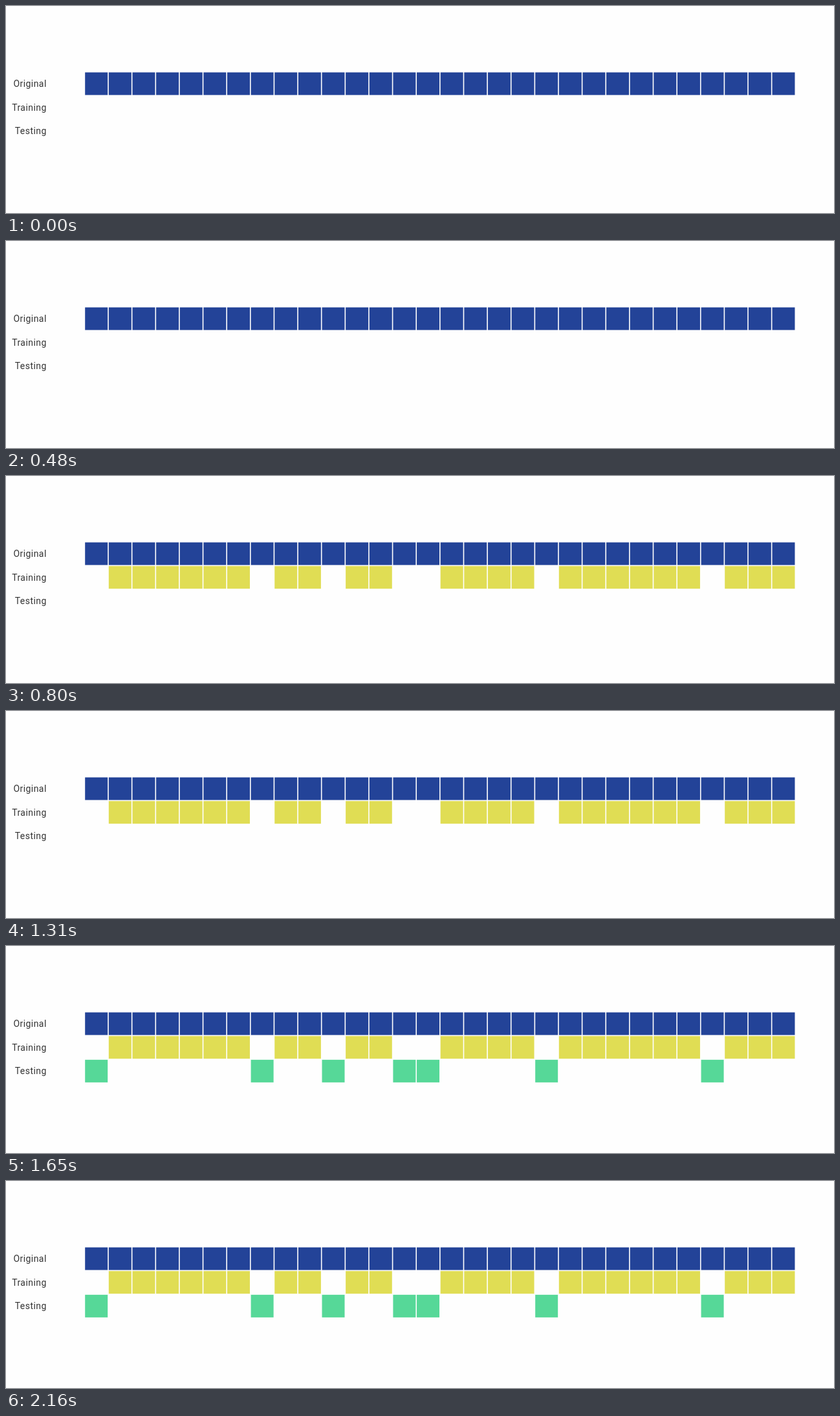
An HTML page that plays this animation: 1280 by 320 pixels, repeating every 2500 ms.

```html
<!DOCTYPE html>
<html lang="en">
<head>
<meta charset="utf-8">
<title>Train and test split</title>
<style>
  html, body { margin: 0; width: 100%; height: 100%; overflow: hidden; background: #fefefe; }
  svg { display: block; width: 1280px; height: 320px; }
  text {
    font: 14px Roboto, sans-serif;
    letter-spacing: 0.45px;
    text-anchor: end;
    fill: #333;
  }
</style>
</head>
<body>
<svg viewBox="0 0 1280 320"></svg>
<script>
  const LOOP = 2500, COUNT = 30, PITCH = 36.63, SIZE = 35;
  const LEFT = 122.2, TOP = 102.6, LABEL_RIGHT = 62.8;
  const testing = new Set([0, 7, 10, 13, 14, 19, 26]);

  const rows = [
    { label: "Original", color: "#234398", from: 0, has: () => true },
    { label: "Training", color: "#e0dd54", from: 800, has: i => !testing.has(i) },
    { label: "Testing", color: "#56d898", from: 1650, has: i => testing.has(i) }
  ];

  const svg = document.querySelector("svg");

  function add(parent, tag, attrs) {
    const el = document.createElementNS("http://www.w3.org/2000/svg", tag);
    for (const [key, value] of Object.entries(attrs)) el.setAttribute(key, value);
    return parent.appendChild(el);
  }

  rows.forEach((row, r) => {
    const y = TOP + r * PITCH;
    add(svg, "text", { x: LABEL_RIGHT, y: y + 22.6 }).textContent = row.label;

    const group = add(svg, "g", { fill: row.color });
    for (let i = 0; i < COUNT; i++) {
      if (row.has(i)) add(group, "rect", { x: LEFT + i * PITCH, y, width: SIZE, height: SIZE });
    }

    if (row.from > 0) {
      group.animate([
        { opacity: 0, offset: 0, easing: "step-end" },
        { opacity: 1, offset: row.from / LOOP },
        { opacity: 1, offset: 1 }
      ], { duration: LOOP, iterations: Infinity });
    }
  });
</script>
</body>
</html>
```
